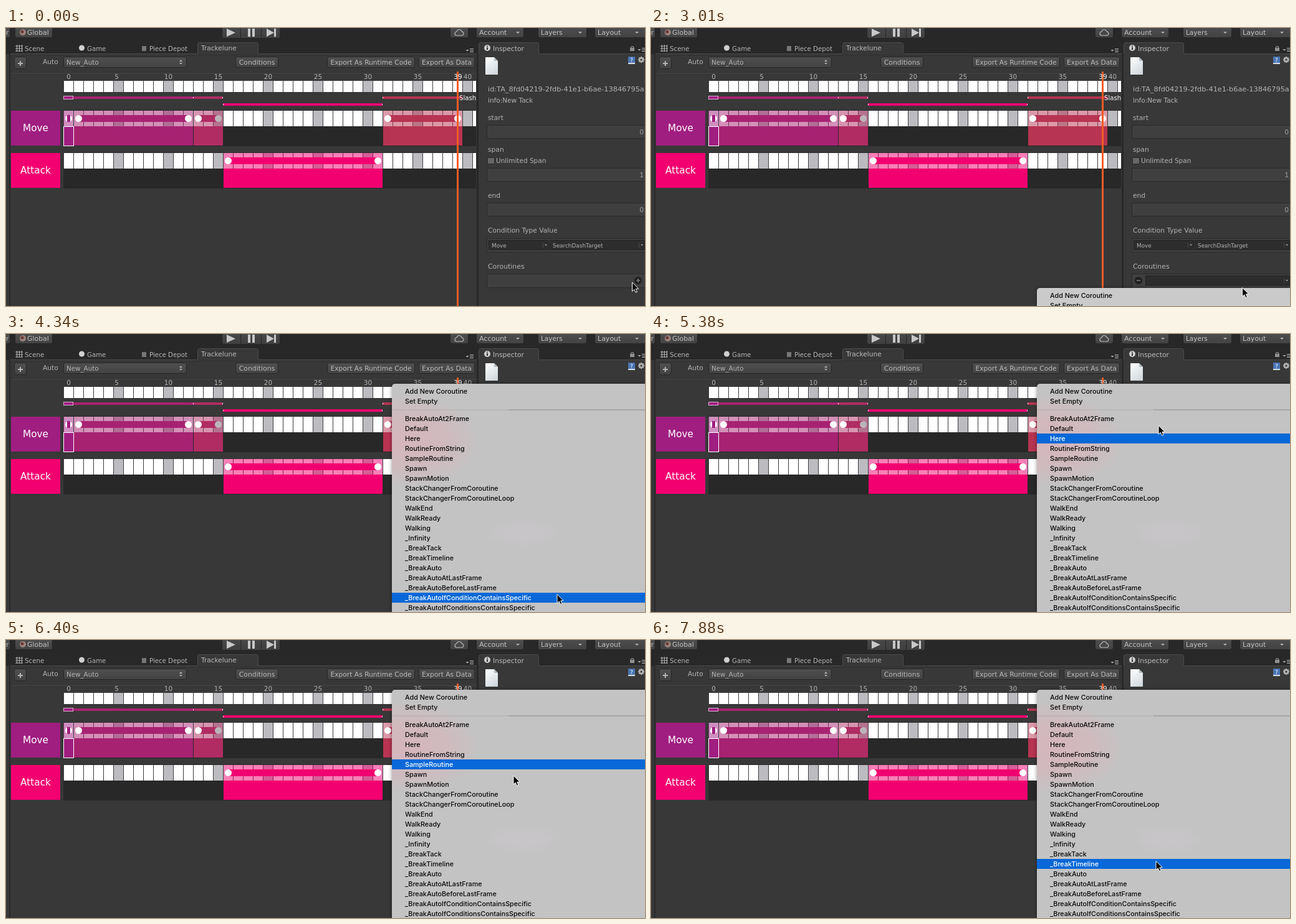
Write an HTML page with a canvas that moves like this. It is 1025 px wide and 447 px high and loops after 8000 ms.

```html
<!DOCTYPE html>
<html lang="en">
<head>
<meta charset="utf-8">
<title>Timeline editor</title>
<style>
html, body { margin: 0; width: 100%; height: 100%; overflow: hidden; background: #383838; }
canvas { display: block; width: 100%; height: 100%; }
</style>
</head>
<body>
<canvas id="stage" width="1025" height="447"></canvas>
<script>
const W = 1025, H = 447, LOOP = 8000;
const g = document.getElementById('stage').getContext('2d');
const UI = '"DejaVu Sans", sans-serif';
const MENU = 'Inter, sans-serif';
const GREY = '#b4b4b4', PANEL = '#383838', DARK = '#282828';

const MENU_ITEMS = ['Add New Coroutine', 'Set Empty', 'BreakAutoAt2Frame', 'Default', 'Here',
  'RoutineFromString', 'SampleRoutine', 'Spawn', 'SpawnMotion', 'StackChangerFromCoroutine',
  'StackChangerFromCoroutineLoop', 'WalkEnd', 'WalkReady', 'Walking', '_Infinity', '_BreakTack',
  '_BreakTimeline', '_BreakAuto', '_BreakAutoAtLastFrame', '_BreakAutoBeforeLastFrame',
  '_BreakAutoIfConditionContainsSpecific', '_BreakAutoIfConditionsContainsSpecific'];

// Each move: start, end, then evenly timed pointer steps [x, y, highlighted item].
const MOVES = [
  [0, 0, [[1004.5, 409]]],
  [150, 480, [[1005.5, 409], [1006, 409], [1005.5, 409]]],
  [1230, 1820, [[1005, 409], [1004, 413], [1002, 419], [1000, 425], [999, 428]]],
  [2110, 2710, [[990, 424], [974, 417], [960, 411], [953, 408.5], [952.5, 408.5]]],
  [3010, 3160, [[948.5, 417.5], null]],
  [3460, 3610, [[883.5, 428], [883.5, 418.5]]],
  [3900, 4340, [[883.5, 418.5], [883.5, 418.5, 20], [884, 418.5, 20], [884, 418.5, 20]]],
  [4930, 5970, [[872, 382, 19], [846, 282, 13], [822, 192, 7], [814, 147, 4],
    [814, 138, 3], [814, 136, 2], [814, 141, 2], [814, 149, 3]]],
  [6110, 7150, [[814, 162, 3], [814, 190, 5], [814, 218, 6], [814, 248, 8],
    [814, 277, 10], [814, 305, 12], [814, 333.5, 14], [814, 355.5, 15]]],
  [7290, 7880, [[814, 382, 17], [812, 406, 18], [811, 412, 19], [810, 384, 18], [810, 355.5, 16]]]
];

function pointerAt(t) {
  const [from, to, steps] = MOVES.filter(m => m[0] <= t).pop();
  const n = steps.length - 1;
  return n ? steps[Math.min(n, Math.floor((t - from) / (to - from) * n + 0.08))] : steps[0];
}

function rect(x, y, w, h, color) {
  g.fillStyle = color;
  g.fillRect(x, y, w, h);
}

function frame(x, y, w, h, color) {
  g.strokeStyle = color;
  g.lineWidth = 1;
  g.strokeRect(x + 0.5, y + 0.5, w - 1, h - 1);
}

function text(s, x, y, size = 10.7, color = GREY, align = 'left', font = UI) {
  g.font = (font === MENU ? '500 ' : '') + size + 'px ' + font;
  g.textAlign = align;
  g.fillStyle = color;
  g.fillText(s, x, y);
}

function circle(x, y, r, color) {
  g.fillStyle = color;
  g.beginPath();
  g.arc(x, y, r, 0, 7);
  g.fill();
}

function poly(points, color) {
  g.fillStyle = color;
  g.beginPath();
  points.forEach(([x, y]) => g.lineTo(x, y));
  g.closePath();
  g.fill();
}

function arrow(x, y, s = 3, color = GREY) {
  poly([[x - s, y], [x + s, y], [x, y + s]], color);
}

function button(x, y, w, h, top = '#505050', bottom = '#424242') {
  const fill = g.createLinearGradient(0, y, 0, y + h);
  fill.addColorStop(0, top);
  fill.addColorStop(1, bottom);
  g.fillStyle = fill;
  g.strokeStyle = '#252525';
  g.lineWidth = 1;
  g.beginPath();
  g.roundRect(x + 0.5, y + 0.5, w - 1, h - 1, 3);
  g.fill();
  g.stroke();
}

function tab(x, w) {
  g.fillStyle = PANEL;
  g.strokeStyle = '#4c4c4c';
  g.lineWidth = 1;
  g.beginPath();
  g.roundRect(x + 0.5, 23.5, w - 1, 22, 3);
  g.fill();
  g.stroke();
}

function listIcon(x, y) {
  arrow(x, y, 2.5);
  for (let i = 0; i < 3; i++) rect(x + 4, y - 2 + i * 2.5, 6, 1, GREY);
}

function drawTopBar() {
  rect(0, 0, W, H, DARK);
  button(-8, -6, 15, 22);
  text('r', 0, 11, 10.7);
  button(14, -6, 61, 22);
  circle(27, 7, 5, '#9c8480');
  circle(26, 6, 2.5, '#6b3a36');
  text('Global', 34, 11, 10.9, '#c4c4c4');

  button(346, -6, 94, 23, '#4a4a4a', '#3f3f3f');
  rect(376, 0, 1, 16, DARK);
  rect(409, 0, 1, 16, DARK);
  poly([[354, 1], [368, 7.5], [354, 14]], '#c8c8c8');
  rect(388, 1, 4, 13, '#c8c8c8');
  rect(395, 1, 4, 13, '#c8c8c8');
  poly([[418, 1], [430, 7.5], [418, 14]], '#c8c8c8');
  rect(430, 1, 3, 13, '#c8c8c8');

  button(712, -6, 30, 22);
  g.strokeStyle = '#c0c0c0';
  g.lineWidth = 1.2;
  g.beginPath();
  g.arc(723, 9, 3, 1.57, 4.3);
  g.arc(727, 6.5, 4, 3.5, 5.7);
  g.arc(731, 9, 3, 5, 7.85);
  g.closePath();
  g.stroke();
  [['Account', 754, 77, 11], ['Layers', 853, 79, 10.5], ['Layout', 944, 90, 11]].forEach(([s, x, w, size]) => {
    button(x, -6, w, 22);
    text(s, x + 5, 11, size, '#c4c4c4');
  });
  arrow(821, 6);
  arrow(921, 6);
  arrow(1012, 6);
}

function drawTabs() {
  tab(307, 98);
  tab(758, 97);
  rect(0, 42, 5, H, PANEL);
  rect(7, 41, 748, H, PANEL);
  rect(758, 41, 267, H, PANEL);
  rect(405, 41, 350, 1, '#4c4c4c');
  rect(7, 41, 300, 1, '#4c4c4c');
  rect(855, 41, 170, 1, '#4c4c4c');

  for (let i = 0; i < 3; i++) {
    rect(17 + i * 4, 27, 1, 11, GREY);
    rect(15, 28.5 + i * 4, 12, 1, GREY);
  }
  text('Scene', 30, 37, 10.3);
  circle(121.5, 32, 4.5, '#d0d0d0');
  text('Game', 130, 37, 10.2);
  rect(218, 29, 7, 8, '#777777');
  text('Piece Depot', 230, 37, 10.2);
  text('Trackelune', 313, 36, 10.6, '#bcbcbc');
  listIcon(740, 35);
  circle(772, 32, 5, '#d0d0d0');
  rect(771, 31, 2, 4, '#333');
  rect(771, 28.5, 2, 1.5, '#333');
  text('Inspector', 781, 37, 10.7, '#bcbcbc');
  g.strokeStyle = '#909090';
  g.lineWidth = 1.2;
  g.beginPath();
  g.arc(1004.5, 32, 2.3, 3.14, 6.28);
  g.stroke();
  rect(1001, 32, 7, 5, '#909090');
  listIcon(1016, 34);
}

function drawToolbar() {
  frame(9, 43, 745, 29, '#303030');
  rect(10, 72, 744, 1, '#484848');
  button(13, 46, 20, 20);
  rect(19, 56, 8, 2, GREY);
  rect(22, 53, 2, 8, GREY);
  text('Auto', 59, 58);
  button(92, 46, 198, 18);
  text('New_Auto', 97, 59, 10.3);
  poly([[278, 54], [283, 54], [280.5, 51]], GREY);
  arrow(280.5, 56, 2.5);
  [['Conditions', 368, 69, 10.9], ['Export As Runtime Code', 515, 141, 10.7],
    ['Export As Data', 662, 90, 10.7]].forEach(([s, x, w, size]) => {
    button(x, 46, w, 18);
    text(s, x + w / 2, 59, size, '#bcbcbc', 'center');
  });
}

function cells(y, h) {
  for (let i = 0; i < 42; i++) {
    const x = 92 + i * 16;
    rect(x, y, 16, h, '#3c3c40');
    rect(x + 1, y, 15, h, i && i % 5 === 0 ? '#bcbcc0' : '#ffffff');
  }
}

function block(x, end, y, color) {
  const w = end - x;
  g.globalAlpha = 0.5;
  rect(x, y, w, 25, color);
  g.globalAlpha = 1;
  rect(x, y + 25, w, 31, color);
}

function bar(x, end, y, color, tail = '#ffffff') {
  rect(x, y, end - x, 11, color);
  circle(x, y + 5.5, 5.5, '#ffffff');
  circle(end, y + 5.5, 5.5, tail);
}

function trackLabel(s, y, color) {
  rect(8, y, 79, 56, color);
  text(s, 47.5, y + 33, 15.3, '#ffffff', 'center');
}

function drawTimeline() {
  const purple = '#a01e80', plum = '#a82272', rose = '#b02c62', red = '#b73452', pink = '#f20070';
  g.save();
  g.beginPath();
  g.rect(0, 42, 754, H);
  g.clip();

  for (let n = 0; n <= 40; n += 5) {
    text(n, n === 5 ? 177.5 : 100.5 + n * 16, 82, 10.5, GREY, 'center');
  }
  cells(85, 18);
  rect(92, 103, 662, 1, '#303030');

  rect(108, 110, 192, 4, plum);
  rect(300, 110, 48, 4, rose);
  rect(604, 110, 128, 4, red);
  rect(348, 121, 256, 4, pink);
  rect(92, 109, 16, 6, purple);
  frame(92, 109, 16, 6, '#d8b0d0');
  [300, 347, 604].forEach(x => rect(x, 111, 1, 2, '#ffffff'));
  [348, 603].forEach(x => rect(x, 122, 1, 2, '#ffffff'));

  [133, 201].forEach(y => {
    cells(y, 25);
    rect(92, y + 25, 662, 32, DARK);
    rect(92, y - 1, 662, 1, '#2c2c2c');
  });
  trackLabel('Move', 133, purple);
  trackLabel('Attack', 201, pink);

  block(92, 108, 133, purple);
  block(109, 300, 133, plum);
  block(301, 348, 133, rose);
  block(605, 732, 133, red);
  block(349, 604, 201, pink);
  frame(92, 158, 17, 32, '#ffffff');
  circle(100.5, 145.5, 5.5, '#ffffff');
  rect(98, 140, 5, 11, purple);
  bar(116.5, 292.5, 140, plum);
  bar(308.5, 340.5, 140, rose, '#bcb4b8');
  bar(612.5, 724.5, 140, red);
  bar(356.5, 596.5, 208, pink);

  rect(723, 70, 3, H - 70, '#f85c26');
  text('39', 725, 82, 10.5, '#ffffff', 'center');
  text('Slash', 727, 116, 10.1, '#ffffff');
  g.restore();
}

function field(y, h, value) {
  rect(771, y, 260, h, '#3f3f3f');
  frame(771, y, 260, h, '#2a2a2a');
  if (value) text(value, 1023, y + h / 2 + 4, 10.7, '#a0a0a0', 'right');
}

function dropdown(x, y, w, s) {
  rect(x, y, w, 16, '#2d2d2d');
  frame(x, y, w, 16, '#222222');
  text(s, x + 5, y + 12, 8.9);
  rect(x + w - 10, y + 4, 1, 8, '#484848');
  arrow(x + w - 5, y + 7, 2);
}

function roundIcon(x, y, plus) {
  circle(x, y, 6, '#202020');
  rect(x - 3, y - 1, 6, 2, '#6a6a6a');
  if (plus) rect(x - 1, y - 3, 2, 6, '#6a6a6a');
}

function drawInspector(added) {
  const page = g.createLinearGradient(769, 47, 789, 75);
  page.addColorStop(0, '#ffffff');
  page.addColorStop(1, '#cdd5da');
  poly([[769, 47], [783, 47], [789, 53], [789, 75], [769, 75]], page);
  poly([[783, 47], [783, 53], [789, 53]], '#b4bec4');
  rect(998, 46, 11, 12, '#4b75b5');
  rect(998, 56, 11, 2, '#d8dde4');
  text('?', 1003.5, 55, 9, '#ffffff', 'center');
  for (let i = 0; i < 8; i++) circle(1019 + 4 * Math.cos(i * 0.785), 51 + 4 * Math.sin(i * 0.785), 1.2, GREY);
  circle(1019, 51, 3.8, GREY);
  circle(1019, 51, 1.6, PANEL);

  text('id:TA_8fd04219-2fdb-41e1-b6ae-13846795a', 773, 102, 11.3);
  text('info:New Tack', 773, 120, 10.5);
  text('start', 773, 148);
  field(156, 22, '0');
  text('span', 773, 199);
  rect(772, 208, 12, 11, '#666666');
  frame(772, 208, 12, 11, '#2a2a2a');
  text('Unlimited Span', 786, 217, 10.5);
  field(225, 22, '1');
  text('end', 773, 273);
  field(281, 22, '0');
  text('Condition Type Value', 773, 329);
  field(338, 23);
  dropdown(774, 341, 97, 'Move');
  dropdown(872, 341, 153, 'SearchDashTarget');
  text('Coroutines', 773, 387, 10.9);
  field(395, added ? 41 : 23);
  if (added) {
    roundIcon(782, 406, false);
    dropdown(793, 398, 232, '');
  }
  roundIcon(1014, added ? 424 : 406, true);
}

function glow(x, y, rx, ry, color) {
  g.save();
  g.translate(x, y);
  g.scale(rx, ry);
  const fade = g.createRadialGradient(0, 0, 0, 0, 0, 1);
  fade.addColorStop(0, `rgba(${color},0.5)`);
  fade.addColorStop(0.55, `rgba(${color},0.32)`);
  fade.addColorStop(1, `rgba(${color},0)`);
  g.fillStyle = fade;
  g.fillRect(-1, -1, 2, 2);
  g.restore();
}

function drawMenu(top, active) {
  const open = top < 200;
  g.save();
  g.shadowColor = 'rgba(0,0,0,0.4)';
  g.shadowBlur = 6;
  g.fillStyle = open ? '#c3c3c3' : '#cacaca';
  g.beginPath();
  g.roundRect(619, top, 430, 500, 5);
  g.fill();
  g.shadowBlur = 0;
  g.clip();
  if (open) {
    glow(645, 172, 115, 75, '232,168,180');
    glow(830, 320, 70, 25, '206,200,206');
  }
  rect(619, top + 41, 406, 2, 'rgba(150,150,150,0.22)');
  rect(806, top + 41, 219, 2, 'rgba(140,140,140,0.4)');
  MENU_ITEMS.forEach((item, i) => {
    const mid = top + (i < 2 ? 12 : 24) + i * 16;
    if (i === active) rect(619, mid - 8, 406, 16, '#0868d8');
    text(item, 640, mid + 4, 10.75, i === active ? '#ffffff' : '#080808', 'left', MENU);
  });
  g.restore();
}

function drawPointer(x, y) {
  g.save();
  g.translate(x, y);
  poly([[0, 0], [0, 14.3], [3.3, 11.3], [5.5, 16.2], [7.9, 15.2], [5.8, 10.4], [10.1, 10.2]], '#000000');
  g.strokeStyle = '#ffffff';
  g.lineWidth = 1;
  g.stroke();
  g.restore();
}

function draw(t) {
  const pointer = pointerAt(t);
  drawTopBar();
  drawTabs();
  drawToolbar();
  drawTimeline();
  drawInspector(t >= 1230);
  if (t >= 2705) drawMenu(t < 3895 ? 418 : 80, pointer ? pointer[2] : undefined);
  if (pointer) drawPointer(pointer[0], pointer[1]);
}

const began = performance.now();
function tick() {
  draw((performance.now() - began) % LOOP);
  requestAnimationFrame(tick);
}
tick();
</script>
</body>
</html>
```
